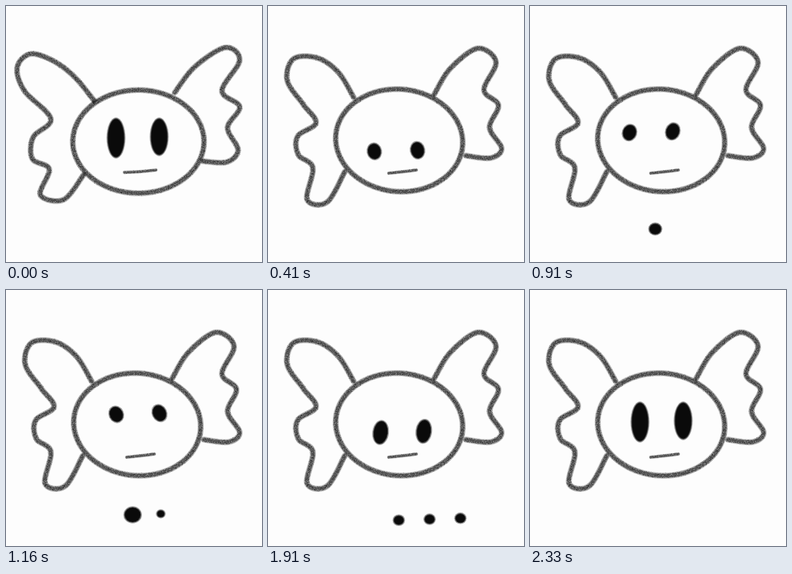
Write an HTML page with a canvas that moves like this. It is 320x320 px and loops after 10000 ms.

```html
<!DOCTYPE html>
<html lang="en">
<head>
<meta charset="utf-8">
<title>Thinking creature</title>
<style>
  html, body { margin: 0; width: 100%; height: 100%; overflow: hidden; background: #fdfdfd; }
  canvas { display: block; width: 100vw; height: 100vh; }
</style>
</head>
<body>
<canvas id="stage" width="320" height="320"></canvas>
<script>
const SIZE = 320, LOOP = 10000, LAST = 28;
const ctx = document.getElementById('stage').getContext('2d');

const startled = {
  head: [165.5, 169.5, 82, 64.5, 0],
  left: [[110,118], [85,88], [58,68], [30,60], [14,77], [23,106], [56,141], [34,164], [33,191], [54,204], [43,236], [72,242], [97,211]],
  right: [[211,108], [236,76], [274,52], [292,68], [270,106], [292,126], [277,152], [290,180], [276,195], [246,194]],
  mouth: [[148,208], [168,207], [188,205]]
};
const calm = {
  head: [164, 168, 79.5, 64, 0.09],
  left: [[107,114], [88,83], [62,65], [32,66], [24,93], [44,123], [60,146], [37,163], [38,186], [56,202], [49,242], [74,245], [96,207]],
  right: [[208,110], [228,78], [262,53], [285,70], [270,105], [288,124], [277,152], [292,178], [278,190], [247,187]],
  mouth: [[151,209], [170,207], [186,205]]
};

const clamp = t => Math.max(0, Math.min(1, t));
const smooth = t => (t = clamp(t), t * t * (3 - 2 * t));
const mix = (a, b, t) => a + (b - a) * t;

function seeded(seed) {
  let s = seed * 7919 + 17;
  return () => {
    s = (s + 0x6D2B79F5) | 0;
    let t = Math.imul(s ^ (s >>> 15), 1 | s);
    t ^= t + Math.imul(t ^ (t >>> 7), 61 | t);
    return ((t ^ (t >>> 14)) >>> 0) / 4294967296;
  };
}

// Smooth curve through the key points, sampled about once per pixel.
function curve(points) {
  const at = i => points[Math.max(0, Math.min(points.length - 1, i))];
  const out = [];
  for (let i = 0; i < points.length - 1; i++) {
    const [a, b, c, d] = [at(i - 1), at(i), at(i + 1), at(i + 2)];
    const n = Math.ceil(Math.hypot(c[0] - b[0], c[1] - b[1]));
    for (let j = 0; j < n; j++) {
      const t = j / n;
      out.push([0, 1].map(k => b[k] + t / 2 * (c[k] - a[k] +
        t * (2 * a[k] - 5 * b[k] + 4 * c[k] - d[k] + t * (3 * (b[k] - c[k]) + d[k] - a[k])))));
    }
  }
  return out;
}

function ring([x, y, rx, ry, tilt]) {
  const n = Math.round(Math.PI * (rx + ry)), c = Math.cos(tilt), s = Math.sin(tilt);
  return Array.from({ length: n + 1 }, (_, i) => {
    const a = i / n * 2 * Math.PI, u = rx * Math.cos(a), v = ry * Math.sin(a);
    return [x + u * c - v * s, y + u * s + v * c];
  });
}

// Soft grey line with a light grain.
function pencil(g, path, width, rnd) {
  g.lineCap = g.lineJoin = 'round';
  g.beginPath();
  for (const [x, y] of path) g.lineTo(x, y);
  for (const [scale, alpha] of [[1.15, .22], [.9, .3], [.65, .38]]) {
    g.lineWidth = width * scale;
    g.strokeStyle = `rgba(0,0,0,${alpha})`;
    g.stroke();
  }
  for (const [x, y] of path) {
    for (let i = 0; i < width; i++) {
      const a = rnd() * 2 * Math.PI, r = width / 2 * Math.sqrt(rnd());
      g.fillStyle = i % 2 ? 'rgba(255,255,255,.13)' : 'rgba(0,0,0,.17)';
      g.fillRect(Math.floor(x + r * Math.cos(a)), Math.floor(y + r * Math.sin(a)), 1, 1);
    }
  }
}

function blob(x, y, rx, ry, tilt = 0) {
  for (const [grow, alpha] of [[.7, .35], [-.3, .6], [-1.2, .9]]) {
    ctx.fillStyle = `rgba(4,4,4,${alpha})`;
    ctx.beginPath();
    ctx.ellipse(x, y, Math.max(.5, rx + grow), Math.max(.5, ry + grow), tilt, 0, 2 * Math.PI);
    ctx.fill();
  }
}

const [startledSheet, calmSheet] = [startled, calm].map((pose, i) => {
  const sheet = document.createElement('canvas');
  sheet.width = sheet.height = SIZE;
  const g = sheet.getContext('2d'), rnd = seeded(i + 1);
  for (const path of [ring(pose.head), curve(pose.left), curve(pose.right)]) pencil(g, path, 6.6, rnd);
  pencil(g, curve(pose.mouth), 3.8, rnd);
  return sheet;
});

// The eyes narrow, roll clockwise once, then widen again.
function drawEyes(step) {
  const open = step < 10 ? 1 - smooth(step / 4) : smooth((step - 20) / 8);
  const degrees = 80 + 24 * (Math.min(step, 19) - 5);
  const angle = degrees * Math.PI / 180;
  const rollX = 131 + .22 * (step - 5) + 11 * Math.cos(angle);
  const rollY = 168 + 14 * Math.sin(angle);
  const x = mix(rollX, 137.5, open ** 2), y = mix(rollY, 165, open ** 2);
  const tilt = .45 * Math.sin(2 * angle + Math.PI / 4) * (1 - open);
  const rx = mix(9, 11.2, open);
  blob(x, y, rx, mix(10.5, 25, open), tilt);
  blob(x + 54, y - 1.5, rx, mix(11, 23.5, open), tilt);
}

// Three dots pop in one after another, drift right and shrink away together.
function drawDots(step) {
  for (let i = 0; i < 3; i++) {
    const birth = 10 + 4 * i, age = step - birth;
    if (age < 0 || step === LAST) continue;
    const x = mix(156 + 37.5 * i, 163.5 + 38.5 * i, clamp(age / (23 - birth)));
    const y = 270.5 + .75 * Math.min(step, 23) - 1.2 * i;
    const r = 10.5 * Math.min(1, .5 + .25 * age) * (1 - .7 * smooth((step - 19) / 8));
    blob(x, y, r * 1.04, r * .96);
  }
}

function draw(step) {
  ctx.fillStyle = '#fdfdfd';
  ctx.fillRect(0, 0, SIZE, SIZE);
  ctx.drawImage(step ? calmSheet : startledSheet, 0, 0);
  drawEyes(step);
  drawDots(step);
}

// Twelve drawings per second, each start rounded down to 10 ms.
function stepAt(ms) {
  let step = 0;
  while (step < LAST && Math.floor((step + 1) * 100 / 12) * 10 <= ms) step++;
  return step;
}

const start = performance.now();
let shown = -1;
function tick() {
  const step = stepAt((performance.now() - start) % LOOP);
  if (step !== shown) draw(shown = step);
  requestAnimationFrame(tick);
}
tick();
</script>
</body>
</html>
```
